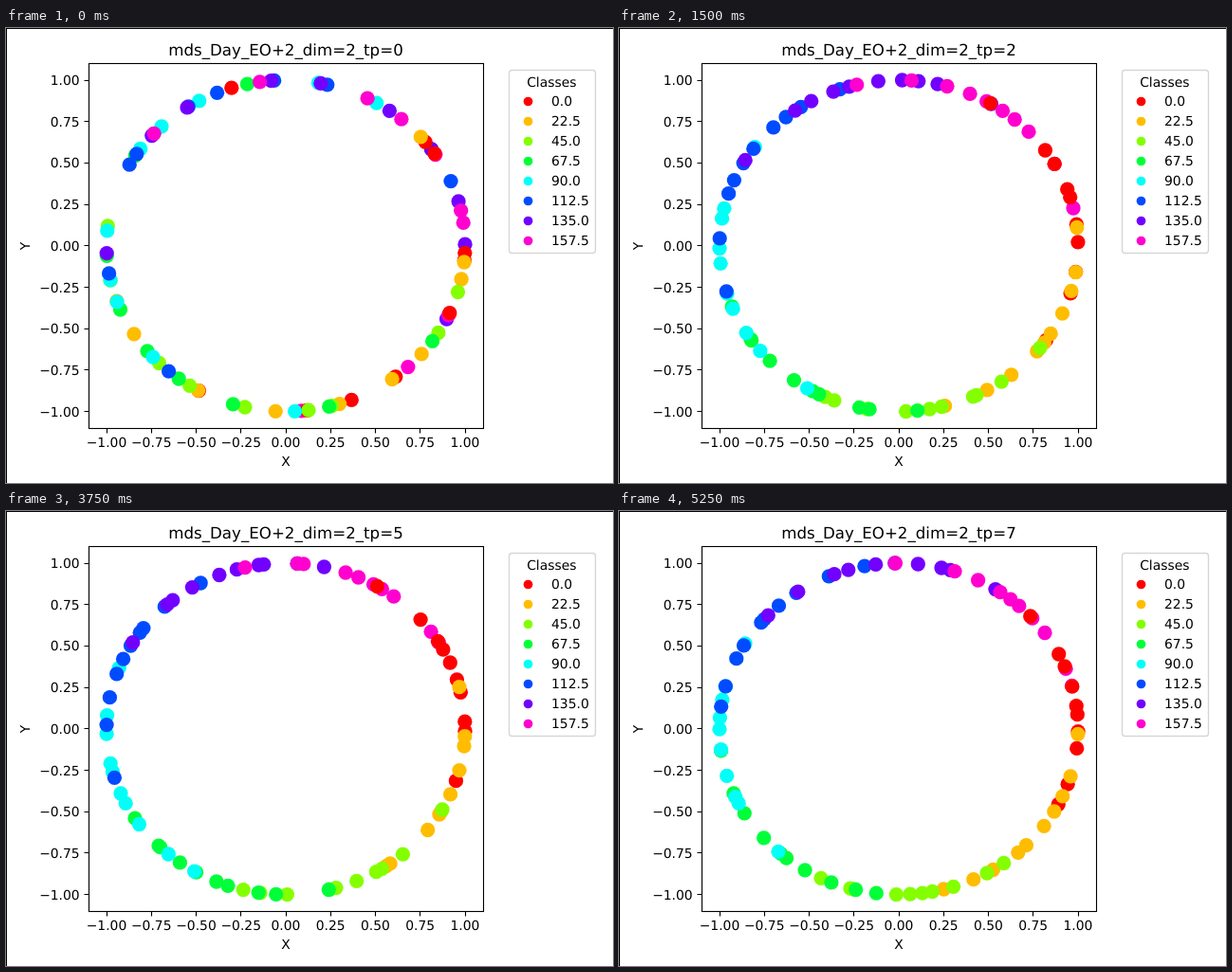
An HTML page that plays this animation: 640 px wide and 480 px high, repeating every 6 s.

```html
<!DOCTYPE html>
<html lang="en">
<head>
<meta charset="utf-8">
<title>Scatter over time</title>
<style>
  html, body { margin: 0; width: 100%; height: 100%; overflow: hidden; background: #fff; }
  svg { display: block; width: 640px; height: 480px; }
  text {
    font: 13.89px "DejaVu Sans", sans-serif;
    text-rendering: geometricPrecision;
    text-anchor: middle;
  }
  .title { font-size: 16.67px; }
  .end { text-anchor: end; }
  .start { text-anchor: start; }
  .axis { fill: none; stroke: #000; stroke-width: 1.11; }
  .step { visibility: hidden; animation: show 6s step-end infinite; }
  @keyframes show {
    0% { visibility: visible; }
    12.5%, 100% { visibility: hidden; }
  }
</style>
</head>
<body>
<svg id="fig" viewBox="0 0 640 480">
  <path d="M0 .5H640M.5 0V480" stroke="#000"/>
  <rect class="axis" x="87.5" y="37.5" width="416" height="385"/>
  <text x="295" y="462">X</text>
  <text transform="translate(25 230) rotate(-90)">Y</text>
  <rect x="530.5" y="44.5" width="91" height="193" rx="3" fill="#fff" stroke="#d6d6d6" stroke-width="1.39"/>
  <text x="575.3" y="62">Classes</text>
</svg>
<script>
const fig = document.getElementById('fig');
const colors = ['#ff0000', '#ffbd00', '#84ff00', '#00ff39', '#00fff6', '#004bff', '#7200ff', '#ff00cf'];
const hold = 750;
const perClass = 10;
const px = x => 295 + 189 * x;
const py = y => 229.8 - 174.8 * y;

function add(parent, tag, attrs, text = '') {
  const el = document.createElementNS('http://www.w3.org/2000/svg', tag);
  for (const key in attrs) el.setAttribute(key, attrs[key]);
  el.textContent = text;
  return parent.appendChild(el);
}

function seeded(seed) {
  return () => (seed = seed * 16807 % 2147483647) / 2147483647;
}

function drawTicks() {
  for (let v = -1; v <= 1; v += 0.25) {
    const label = v.toFixed(2).replace('-', '\u2212');
    const x = Math.floor(px(v)) + 0.5;
    const y = Math.floor(py(v)) + 0.5;
    add(fig, 'path', { class: 'axis', d: `M${x} 422.5v5M87.5 ${y}h-5` });
    add(fig, 'text', { x: px(v), y: 442 }, label);
    add(fig, 'text', { class: 'end', x: 77.7, y: Math.round(py(v) + 5) }, label);
  }
}

function drawLegend() {
  colors.forEach((fill, i) => {
    const y = 77 + 21 * i;
    add(fig, 'circle', { cx: 550.5, cy: y + 0.5, r: 4.86, fill });
    add(fig, 'text', { class: 'start', x: 575, y: y + 5 }, (i * 22.5).toFixed(1));
  });
}

// Classes follow each other around the ring, 45 degrees apart, each dense at its middle.
function drawStep({ start, turn, spread }, step) {
  const rand = seeded((step + 1) * 987654);
  const g = add(fig, 'g', { class: 'step', style: `animation-delay:${(step - 8) * hold}ms` });
  add(g, 'text', { class: 'title', x: 295, y: 29 }, `mds_Day_EO+2_dim=2_tp=${step}`);
  for (let k = 0; k < perClass; k++) {
    colors.forEach((fill, i) => {
      const u = 2 * (k + rand()) / perClass - 1;
      const deg = start + turn * i + spread * (0.6 * u + 0.4 * u ** 3);
      const a = deg * Math.PI / 180;
      add(g, 'circle', { cx: px(Math.cos(a)).toFixed(1), cy: py(Math.sin(a)).toFixed(1), r: 7.64, fill });
    });
  }
}

drawTicks();
drawLegend();
[
  { start: -20, turn: -45, spread: 130 },
  { start: 185, turn: -45, spread: 58 },
  { start: 12, turn: -45, spread: 50 },
  { start: -60, turn: 45, spread: 46 },
  { start: 200, turn: 45, spread: 46 },
  { start: 20, turn: -45, spread: 44 },
  { start: 207, turn: -45, spread: 40 },
  { start: 5, turn: -45, spread: 44 },
].forEach(drawStep);
</script>
</body>
</html>
```
